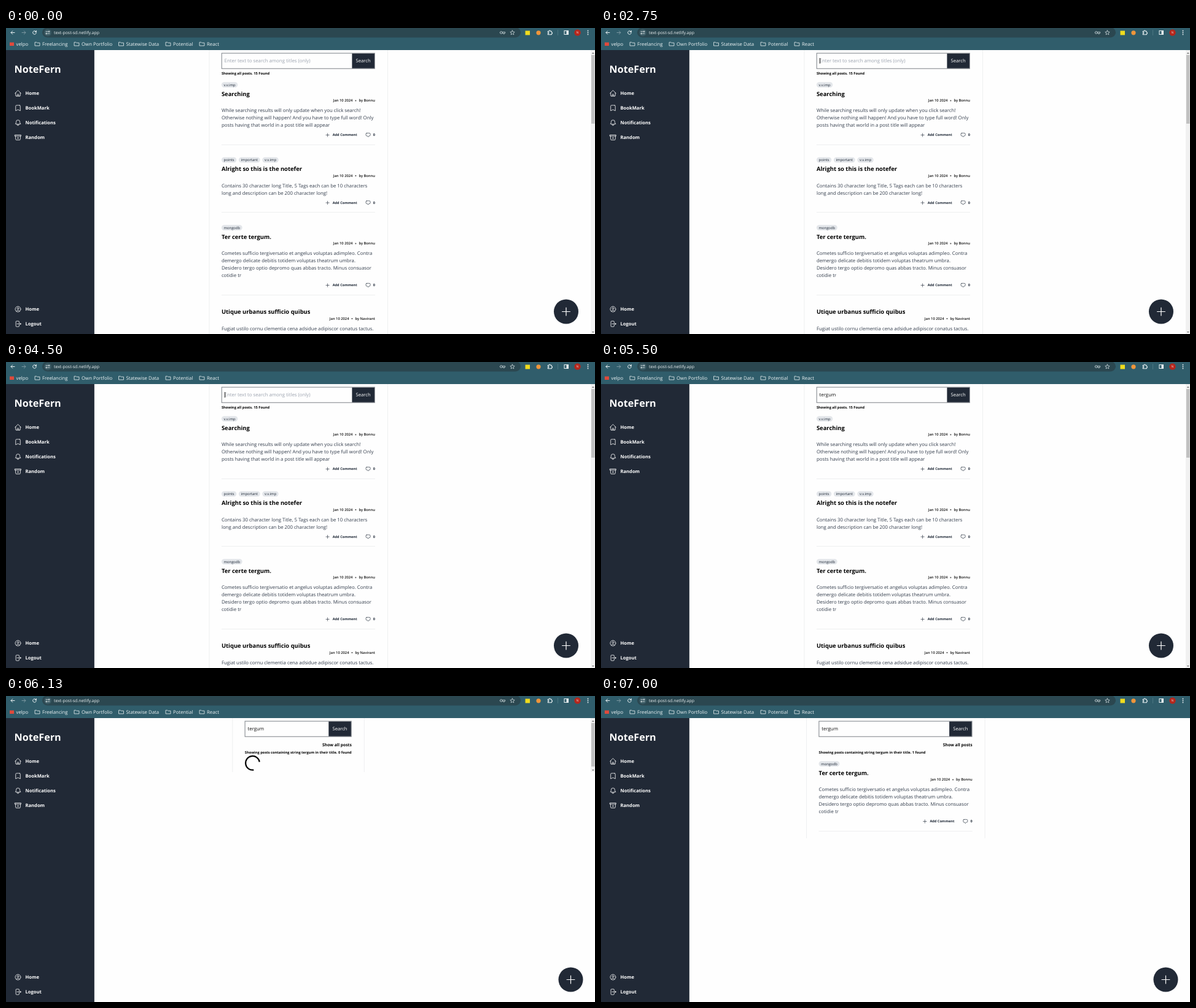
An HTML page with a canvas for the animation above (8 s loop, 959 px wide and 499 px high).

```html
<!DOCTYPE html>
<html lang="en">
<head>
<meta charset="utf-8">
<title>Post search</title>
<style>
  html, body { margin: 0; width: 100%; height: 100%; overflow: hidden; background: #fefefe; }
  canvas { display: block; width: 959px; height: 499px; }
</style>
</head>
<body>
<canvas id="stage"></canvas>
<script>
const W = 959, H = 499, LOOP = 8000, TAU = Math.PI * 2;
const FONT = '"Open Sans", "Noto Sans", sans-serif';
const DARK = '#212936', LINE = '#eeeff0', TOP = 36;

const canvas = document.getElementById('stage');
const ctx = canvas.getContext('2d');
const ratio = window.devicePixelRatio || 1;
canvas.width = W * ratio;
canvas.height = H * ratio;

// Timeline, in ms
const CARET_ON = [[500, 1000], [1630, 2130], [2750, 3000], [4500, 4880], [5000, 5500]];
const SELECT_FROM = 3250, SELECT_TO = 4500;
const PASTE = 5000, LOADING = 6130, RESULT = 6880;
const SPIN_STEP = 125;

// Icons in a 24 x 24 box
const ICONS = {
  home: 'M2.3 12 12 2.4 21.7 12M4.5 9.8V20a1 1 0 0 0 1 1H9.8v-5a1 1 0 0 1 1-1h2.4a1 1 0 0 1 1 1v5h4.3a1 1 0 0 0 1-1V9.8M8.3 21h8.2',
  bookmark: 'M17.6 3.3a2.2 2.2 0 0 1 1.9 2.2V21L12 17.2 4.5 21V5.5a2.2 2.2 0 0 1 1.9-2.2 48 48 0 0 1 11.2 0z',
  bell: 'M20.3 15.8A9 9 0 0 1 18 9.7V9A6 6 0 0 0 6 9v.7a9 9 0 0 1-2.3 6.1 24 24 0 0 0 16.6 0M9.1 17.1a3 3 0 1 0 5.8 0',
  archive: 'M20.2 7.5 19.6 18.1a2.2 2.2 0 0 1-2.2 2.1H6.6a2.2 2.2 0 0 1-2.2-2.1L3.8 7.5M9.8 11.6l4.5 4.5M14.3 11.6l-4.5 4.5M2.3 3.8H21.7V7.5H2.3z',
  user: 'M18 18.7a7.5 7.5 0 0 0-12 0M21 12a9 9 0 1 1-18 0 9 9 0 0 1 18 0M15 9.8a3 3 0 1 1-6 0 3 3 0 0 1 6 0',
  logout: 'M15.8 9V5.2A2.2 2.2 0 0 0 13.5 3h-6a2.2 2.2 0 0 0-2.3 2.2v13.6A2.2 2.2 0 0 0 7.5 21h6a2.2 2.2 0 0 0 2.3-2.2V15M18.8 15l3-3-3-3M21.8 12H9',
  chat: 'M5 3.5a48 48 0 0 1 14 0 3.2 3.2 0 0 1 2.7 3.2v6a3.2 3.2 0 0 1-2.7 3.2l-3.2.4a1.6 1.6 0 0 0-1.2.7L12 21 9.4 17a1.6 1.6 0 0 0-1.2-.7L5 16a3.2 3.2 0 0 1-2.7-3.2v-6A3.2 3.2 0 0 1 5 3.5z',
  plus: 'M12 4.5v15M4.5 12h15',
  back: 'M20 12H4.5M11 5l-7 7 7 7',
  forward: 'M4 12h15.5M13 5l7 7-7 7',
  reload: 'M19 8A8 8 0 1 0 20 13M20 3v6h-6',
  folder: 'M2 19V5.5h7l2.5 2.5H22V19z',
  tune: 'M3 7h8M15 7a3 3 0 1 0 6 0 3 3 0 1 0-6 0M13 17h8M3 17a3 3 0 1 0 6 0 3 3 0 1 0-6 0',
  key: 'M2 12a4.5 4.5 0 1 0 9 0 4.5 4.5 0 1 0-9 0M11 10h11v4h-3v3h-4v-3h-4',
  star: 'M12 2.5l2.9 6.3 6.9.7-5.2 4.6 1.5 6.8-6.1-3.5-6.1 3.5 1.5-6.8L2.2 9.5l6.9-.7z',
  puzzle: 'M4 7h5a2.6 2.6 0 1 1 5 0h5v5a2.6 2.6 0 1 1 0 5v4H4v-5a2.5 2.5 0 1 0 0-4z'
};
for (const name in ICONS) ICONS[name] = new Path2D(ICONS[name]);

const MENU = [
  ['home', 'Home', 106.5], ['bookmark', 'BookMark', 130.5],
  ['bell', 'Notifications', 154.5], ['archive', 'Random', 178.5],
  ['user', 'Home', 458.5], ['logout', 'Logout', 482.5]
];
const FOLDERS = [
  ['Freelancing', 59], ['Own Portfolio', 123], ['Statewise Data', 195.5],
  ['Potential', 272], ['React', 327]
];
const MATCH = {
  y: 340.5, tags: ['mongodb'], title: 'Ter certe tergum.', by: 'Bonnu',
  lines: [
    'Cometes sufficio tergiversatio et angelus voluptas adimpleo. Contra',
    'demergo delicate debitis totidem voluptas theatrum umbra.',
    'Desidero tergo optio depromo quas abbas tracto. Minus consuasor',
    'cotidie tr'
  ]
};
const POSTS = [
  {
    y: 107.5, tags: ['v.v.imp'], title: 'Searching', by: 'Bonnu',
    lines: [
      'While searching results will only update when you click search!',
      'Otherwise nothing will happen! And you have to type full word! Only',
      'posts having that world in a post title will appear'
    ]
  },
  {
    y: 230, tags: ['points', 'important', 'v.v.imp'],
    title: 'Alright so this is the notefer', by: 'Bonnu',
    lines: [
      'Contains 30 character long Title, 5 Tags each can be 10 characters',
      'long and description can be 200 character long!'
    ]
  },
  MATCH,
  {
    y: 463, tags: [], title: 'Utique urbanus sufficio quibus', by: 'Navirant',
    lines: ['Fugiat ustilo cornu clementia cena adsidue adipiscor conatus tactus.']
  }
];

function setFont(size, weight = 400) {
  ctx.font = `${weight} ${size}px ${FONT}`;
}

function textWidth(str, size, weight) {
  setFont(size, weight);
  return ctx.measureText(str).width;
}

// y is the middle of the capitals
function text(str, x, y, size, color, weight = 400, align = 'left') {
  setFont(size, weight);
  ctx.textAlign = align;
  ctx.fillStyle = color;
  ctx.fillText(str, x, y + size * 0.36);
}

function rect(x, y, w, h, color) {
  ctx.fillStyle = color;
  ctx.fillRect(x, y, w, h);
}

function pill(x, y, w, h, color, r = h / 2) {
  ctx.fillStyle = color;
  ctx.beginPath();
  ctx.roundRect(x, y, w, h, r);
  ctx.fill();
}

function disc(x, y, r, color) {
  ctx.fillStyle = color;
  ctx.beginPath();
  ctx.arc(x, y, r, 0, TAU);
  ctx.fill();
}

function icon(name, cx, cy, size, color, weight = 1.6) {
  ctx.save();
  ctx.translate(cx - size / 2, cy - size / 2);
  ctx.scale(size / 24, size / 24);
  ctx.strokeStyle = color;
  ctx.lineWidth = weight;
  ctx.lineCap = ctx.lineJoin = 'round';
  ctx.stroke(ICONS[name]);
  ctx.restore();
}

function drawBrowser() {
  const ink = '#eef4f5';
  rect(0, 0, W, TOP, '#305d6b');
  pill(59, -1, 779, 16.5, '#2b4750');
  icon('back', 11, 7.5, 9, ink, 2.6);
  icon('forward', 29, 7.5, 9, '#7f9aa3', 2.6);
  icon('reload', 46.5, 7.5, 8.5, ink, 2.8);
  disc(68, 7.5, 6, '#3a5963');
  icon('tune', 68, 7.5, 8, ink, 2.4);
  text('text-post-sd.netlify.app', 78, 7.3, 6.92, ink);
  icon('key', 808.5, 7.5, 10, '#c9d5d9', 2);
  icon('star', 824.5, 7.5, 9, '#d5dfe2', 2);

  rect(845.5, 4.5, 7.5, 7, '#f0dc1e');
  disc(867, 7.8, 3.6, '#f0953a');
  icon('puzzle', 885.5, 7.2, 9.5, ink, 2.6);
  rect(898, 3, 1, 9, '#4b7581');
  ctx.strokeStyle = ink;
  ctx.lineWidth = 1;
  ctx.strokeRect(909, 4.5, 6.5, 6);
  rect(912.5, 4.5, 3, 6, ink);
  disc(930.5, 7.5, 5.2, '#b5271d');
  text('N', 930.5, 7.5, 5, '#f6d9d6', 400, 'center');
  for (const y of [4.5, 7.5, 10.5]) disc(947.5, y, 0.9, ink);

  rect(6, 23.5, 7, 5.5, '#df4a3c');
  text('velpo', 16.5, 26, 7.8, ink);
  for (const [label, x] of FOLDERS) {
    icon('folder', x - 8, 25.8, 9.5, ink, 2);
    text(label, x, 26, 7.8, ink);
  }
}

function drawSidebar() {
  rect(0, TOP, 143.85, H - TOP, DARK);
  text('NoteFern', 13.5, 66.8, 16.2, '#fff', 700);
  for (const [name, label, y] of MENU) {
    icon(name, 19.5, y, 12, '#fff');
    text(label, 31.5, y, 7.6, '#fff', 700);
  }
}

function drawAddButton(x) {
  disc(x, 462.5, 20, DARK);
  icon('plus', x, 462.5, 20.5, '#fff', 1.4);
}

function arrow(y, dir) {
  ctx.fillStyle = '#777';
  ctx.beginPath();
  ctx.moveTo(953.8, y + dir);
  ctx.lineTo(957.8, y + dir);
  ctx.lineTo(955.8, y - dir);
  ctx.fill();
}

function drawScrollbar(bottom, thumbEnd) {
  rect(952, TOP, 7, bottom - TOP, '#f1f1f1');
  rect(953, 44, 5.5, thumbEnd - 44, '#c1c1c1');
  arrow(40.8, 1.1);
  arrow(bottom - 3, -1.1);
}

function drawColumn(left, right, bottom) {
  rect(left - 20.5, TOP, 1, bottom - TOP, LINE);
  rect(right + 20, TOP, 1, bottom - TOP, LINE);
}

function drawSearch(left, right, value, caret) {
  ctx.strokeStyle = '#7c8087';
  ctx.lineWidth = 1;
  ctx.strokeRect(left + 0.3, 41.1, right - left - 0.9, 25.1);
  rect(right - 37.5, 41.6, 36.5, 24.1, DARK);
  text('Search', right - 19.3, 53.6, 7.7, '#fff', 500, 'center');
  const x = left + 4.7;
  if (value) text(value, x, 53.6, 7.82, '#111');
  else text('Enter text to search among titles (only)', x, 53.6, 7.82, '#9ca3af');
  if (caret) {
    const shift = value ? textWidth(value, 7.82) : 0;
    rect(Math.round(x + shift), 49, 1, 9, '#111');
  }
}

function drawSelection(left, y) {
  const start = textWidth('Ter certe ', 9.42, 700);
  const width = textWidth('tergum', 9.42, 700);
  rect(left + start, y - 7.5, width, 15, '#1e90ff');
}

function drawPost(post, left, right, y, selected) {
  let x = left;
  for (const tag of post.tags) {
    const w = textWidth(tag, 5.85) + 7.4;
    pill(x, y - 19.2, w, 8.6, '#e3e6ea');
    text(tag, x + 3.7, y - 15, 5.85, '#1f2937');
    x += w + 3.6;
  }
  if (selected) drawSelection(left, y);
  text(post.title, left, y, 9.42, '#000', 700);

  const by = 'by ' + post.by;
  const byLeft = right - textWidth(by, 5.8, 600);
  text(by, right, y + 10.7, 5.8, '#111', 600, 'right');
  disc(byLeft - 5, y + 11, 1, '#444');
  text('Jan 10 2024', byLeft - 10, y + 10.7, 5.8, '#111', 600, 'right');

  post.lines.forEach((line, i) => text(line, left, y + 26.8 + i * 12, 7.82, '#323c4b'));

  const foot = y + 31 + post.lines.length * 12;
  icon('plus', right - 77.3, foot, 8.4, '#1f2937', 1.8);
  text('Add Comment', right - 69.2, foot - 0.2, 5.62, '#1f2937', 700);
  icon('chat', right - 11.3, foot, 8.6, '#1f2937', 1.8);
  text('0', right, foot - 0.2, 5.62, '#1f2937', 700, 'right');
  rect(left, Math.floor(foot + 15.7), right - left, 1, LINE);
}

function drawSpinner(cx, cy, t) {
  const steps = Math.floor(t / SPIN_STEP) - 52;
  const gap = (171 + steps * 45) / 360 * TAU;
  ctx.strokeStyle = '#000';
  ctx.lineWidth = 2.2;
  ctx.lineCap = 'butt';
  ctx.beginPath();
  ctx.arc(cx, cy, 11.4, gap + TAU / 8, gap + TAU * 7 / 8);
  ctx.stroke();
}

function drawSearchNote(left, right, count) {
  text('Show all posts', right, 79.5, 6.75, '#000', 700, 'right');
  text(`Showing posts containing string tergum in their title. ${count} found`,
    left, 92.2, 5.72, '#000', 700);
}

function drawList(t) {
  const left = 350.9, right = 600.9;
  const caret = CARET_ON.some(([from, to]) => t >= from && t < to);
  const selecting = t >= SELECT_FROM && t < SELECT_TO;
  drawColumn(left, right, H);
  drawSearch(left, right, t >= PASTE ? 'tergum' : '', caret);
  text('Showing all posts. 15 Found', left, 74.3, 5.72, '#000', 700);
  for (const post of POSTS) {
    drawPost(post, left, right, post.y, selecting && post === MATCH);
  }
  drawScrollbar(H, 156);
  drawAddButton(912);
}

function drawLoading(t) {
  const left = 388.8, right = 562.8;
  drawColumn(left, right, 124);
  drawSearch(left, right, 'tergum', false);
  drawSearchNote(left, right, 0);
  drawSpinner(401.5, 109.3, t);
  drawScrollbar(124, 115);
  drawAddButton(919.5);
}

function drawResult() {
  const left = 354.6, right = 604.6;
  drawColumn(left, right, 232);
  drawSearch(left, right, 'tergum', false);
  drawSearchNote(left, right, 1);
  drawPost(MATCH, left, right, 125.5, false);
  drawAddButton(919.5);
}

function draw(t) {
  ctx.setTransform(ratio, 0, 0, ratio, 0, 0);
  ctx.textRendering = 'geometricPrecision';
  rect(0, 0, W, H, '#fefefe');
  if (t < LOADING) drawList(t);
  else if (t < RESULT) drawLoading(t);
  else drawResult();
  drawSidebar();
  drawBrowser();
}

const start = performance.now();
function frame() {
  draw((performance.now() - start) % LOOP);
  requestAnimationFrame(frame);
}
frame();
</script>
</body>
</html>
```
